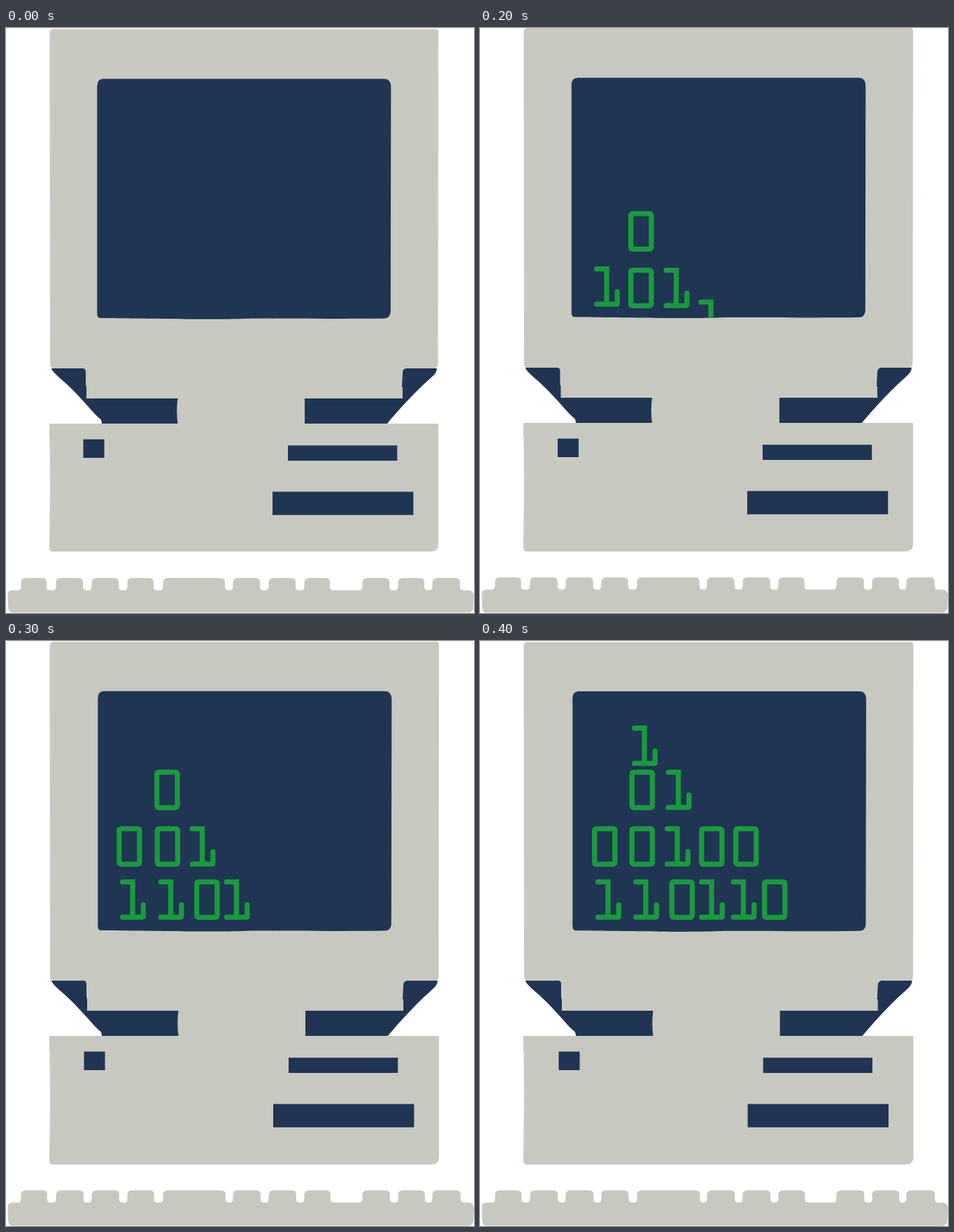
An HTML page that plays this animation: 669x837 px, repeating every 0.5 s.

```html
<!DOCTYPE html>
<html lang="en">
<head>
<meta charset="utf-8">
<title>Binary computer</title>
<style>
html, body { margin: 0; width: 100%; height: 100%; overflow: hidden; background: #fff; }
svg { display: block; width: 100%; height: 100%; }
.case { fill: #c7c8c0; }
.dark { fill: #203553; }
.digits { fill: none; stroke: #189b3d; stroke-width: 7.3; stroke-linecap: round; }
</style>
</head>
<body>
<svg viewBox="0 0 669 837" preserveAspectRatio="none">
  <defs>
    <clipPath id="glass"><path id="glassShape"/></clipPath>
    <rect id="d0" x="3.7" y="3.7" width="29.2" height="50.6" rx="2.5"/>
    <path id="d1" d="M3.7 3.7H18V54M3.7 54.2H31.5q1.8 0 1.8-1.8V36.5"/>
  </defs>
  <path id="case" class="case"/>
  <path id="keys" class="case"/>
  <path id="screen" class="dark"/>
  <path id="trim" class="dark"/>
  <g clip-path="url(#glass)"><g id="digits" class="digits"></g></g>
</svg>
<script>
const $ = id => document.getElementById(id);
const LOOP = 500;

// l, r: sideways drift of left and right parts; y: drift of lower parts;
// rows: [top, digits, left edges]
const poses = [
  { at: 0, l: 0, r: 0, top: 1.5, glass: 0, y: 0, rows: [] },
  { at: 200, l: .5, r: 1, top: 0, glass: -1.5, y: -1, rows: [
    [262, '0', [212]],
    [341, '1', [163]],
    [343, '01', [212, 262.5]],
    [388.5, '1', [312]]] },
  { at: 300, l: 1, r: 1, top: 1, glass: -1, y: -1, rows: [
    [184, '0', [212]],
    [265, '001', [158, 212.5, 262.5]],
    [341, '1101', [163, 217.5, 269, 311.5]]] },
  { at: 400, l: 2, r: 1.7, top: 1.5, glass: -.7, y: -1, rows: [
    [121, '1', [217]],
    [184, '01', [213.5, 265.5]],
    [265, '00100', [160, 213.5, 264, 313, 362]],
    [341, '110110', [165, 219, 270.5, 313, 358.5, 403]]] }
];

const keyEdges = [[22, 58], [72, 110], [123, 161], [174, 211], [225, 313], [325, 363],
  [376, 414], [427, 463], [510, 548], [561, 598], [610, 649]];

const box = (x, y, w, h) => `M${x} ${y}h${w}v${h}h${-w}z`;

function casePath({ r, top, y }) {
  const R = 618 + Math.min(r, 1.5);
  const foot = 487 + y, base = 566 + y;
  return `M67 ${top}H${R - 4}q4 0 4 4L${R - .5} 480q0 5-4 7L${R - 5} ${foot}H66L63 483L62.5 ${top + 5}q0-4 4.5-5z`
    + `M113 ${foot - 3}H569V${foot + 44}H430V${base + 1}H243V${foot + 44}H115z`
    + `M62 ${base}H${R}V738q0 11-11 11H67q-5 0-5-5L63 660L62.5 586H62z`;
}

function screenPath({ l, r, glass }) {
  const L = 130.3 + l, R = 550.3 + r, t = 72.8 + glass, b = 415.5 + glass;
  return `M${L + 9} ${t}H${R - 10}q10 0 10 12L${R - .5} ${b - 9}q-1 9-9 9`
    + `C480 ${b + 1} 410 ${b} 350 ${b}C310 ${b + 2} 260 ${b + 1} ${L + 5} ${b - .5}q-5 0-5-6V${t + 10}q0-10 9-10z`;
}

function trimPath({ l, r, y }) {
  const a = 487 + y, b = 530 + y, c = 566 + y;
  return `M65 ${a}H${110 + l}q4 0 4 5V${a + 23}l1 4V${b}H${245.5 + l}q-2.5 18 0 ${c - b}H137q0-6-4-8`
    + `C122 ${c - 18} 108 ${a + 42} 84 ${a + 20}Q65 ${a + 4} 65 ${a}z`
    + `M${616 + r} ${a}H${572 + r}q-5 0-5 7l-1 20h1V${b}H${427 + r}V${c}H${545 + r}`
    + `C${558 + r} ${c - 16} ${584 + r} ${a + 34} ${609 + r} ${a + 12}q7-6 7-12z`
    + box(110.5 + l, 588.5 + y, 30, 26.5)
    + box(403 + r, 597.3 + y, 156.2, 21.7)
    + box(381 + r, 663.6 + y, 201.3, 33.2);
}

function keysPath({ r, y }) {
  const t = 787 + y, m = 804.5 + y;
  let d = `M8 836.5Q3 836 3 826L2.5 811Q2 ${m} 9 ${m}H16`;
  for (const [left, right] of keyEdges) {
    const e = right + r * .8;
    d += `H${left - 5}Q${left} ${m} ${left - .5} ${m - 7}V${t + 6}Q${left} ${t} ${left + 6} ${t}`
      + `H${e - 6}Q${e} ${t} ${e} ${t + 6}V${m - 5}Q${e} ${m} ${e + 5} ${m}`;
  }
  return d + `H661Q669 ${m} 669 813L668 830Q667 836.5 661 836.5z`;
}

function draw(p) {
  $('case').setAttribute('d', casePath(p));
  $('keys').setAttribute('d', keysPath(p));
  $('trim').setAttribute('d', trimPath(p));
  for (const id of ['screen', 'glassShape']) $(id).setAttribute('d', screenPath(p));
  $('digits').innerHTML = p.rows.map(([y, text, xs]) =>
    xs.map((x, i) => `<use href="#d${text[i]}" x="${x}" y="${y}"/>`).join('')).join('');
}

const start = performance.now();
let shown;
function tick() {
  const t = (performance.now() - start) % LOOP;
  const pose = poses.findLast(p => p.at <= t);
  if (pose !== shown) draw(shown = pose);
  requestAnimationFrame(tick);
}
tick();
</script>
</body>
</html>
```
